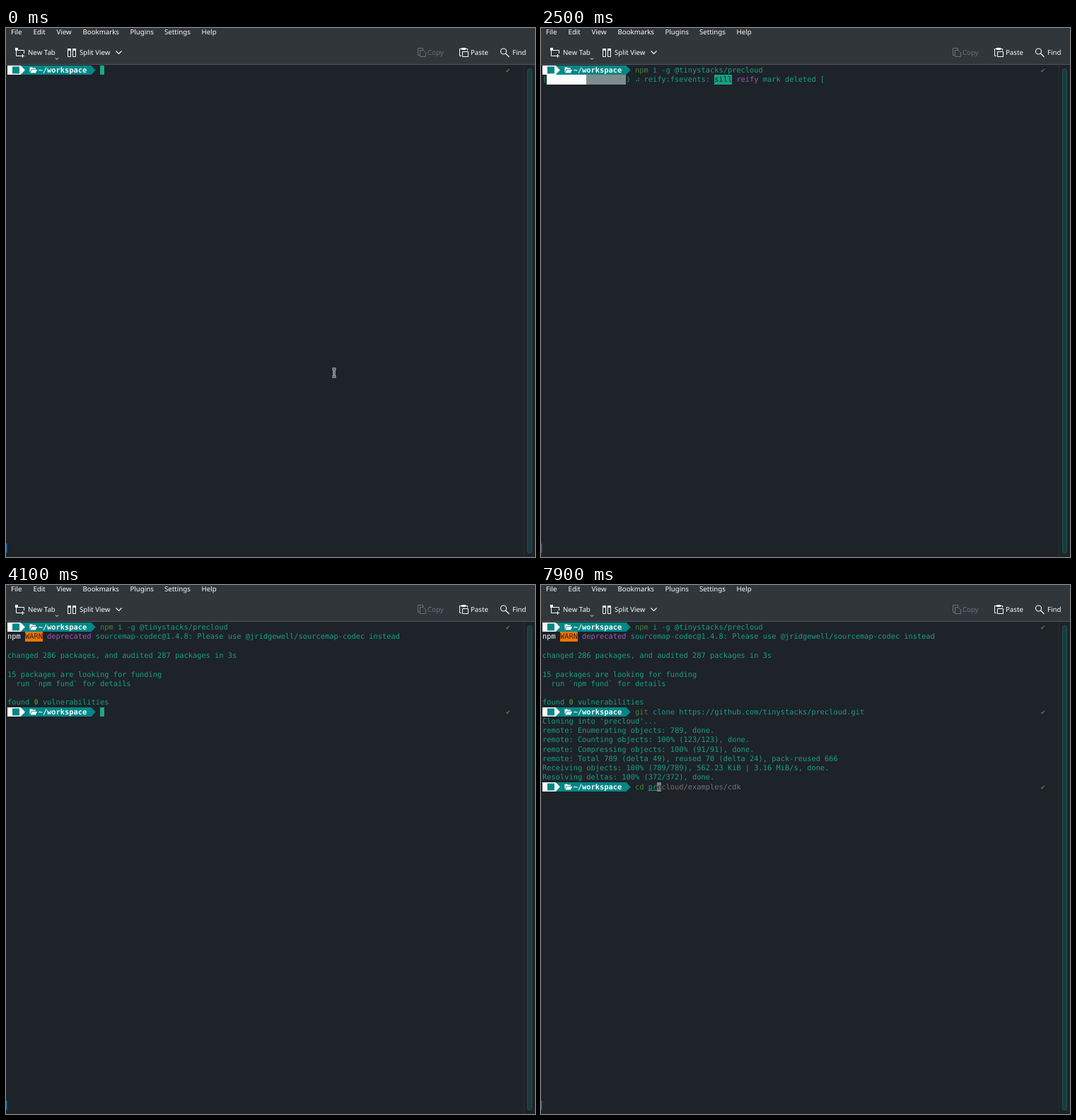
These frames come from a looping animation (748x748 px, 8000 ms). An HTML page with a canvas:

```html
<!DOCTYPE html>
<html lang="en">
<head>
<meta charset="utf-8">
<title>Terminal session</title>
<style>
html, body { margin: 0; width: 100%; height: 100%; overflow: hidden; background: #1e2229; }
canvas { display: block; }
</style>
</head>
<body>
<canvas id="stage" width="748" height="748"></canvas>
<script>
const ctx = document.getElementById('stage').getContext('2d');
const LOOP = 8000, CELL = 6.236, ROW = 13.26, COLS = 115;
const MONO = '10.36px "DejaVu Sans Mono", "DejaVu Sans", monospace';
const UI = '9.7px "Noto Sans", sans-serif';
const BG = '#1e2229', FG = '#16a085', GREEN = '#44853a', PURPLE = '#9b59b6', WHITE = '#fcfcfc',
  TEAL = '#008787', GRAY = '#7f8c8d', HINT = '#78706f', RED = '#ed1515', CURSOR = '#1aa88a';

const X = col => 2 + col * CELL;
const Y = row => 53.2 + row * ROW;

function rect(x, y, w, h, color) {
  ctx.fillStyle = color;
  ctx.fillRect(x, y, w, h);
}

function poly(color, ...pts) {
  ctx.fillStyle = color;
  ctx.beginPath();
  for (let i = 0; i < pts.length; i += 2) ctx.lineTo(pts[i], pts[i + 1]);
  ctx.fill();
}

function stroke(path, color = WHITE, width = 1) {
  ctx.strokeStyle = color;
  ctx.lineWidth = width;
  ctx.stroke(new Path2D(path));
}

function block(row, col, count, color) {
  const x = Math.round(X(col)), y = Math.round(Y(row));
  rect(x, y, Math.round(X(col + count)) - x, Math.round(Y(row + 1)) - y, color);
}

// Writes text on the character grid and returns the next free column.
function put(row, col, text, color = FG, bold = false) {
  ctx.font = (bold ? 'bold ' : '') + MONO;
  ctx.fillStyle = color;
  for (const ch of text) {
    if (col >= COLS) break;
    if (ch !== ' ') ctx.fillText(ch, X(col), Y(row) + 10);
    col++;
  }
  return col;
}

function label(text, x, y, color = WHITE) {
  ctx.font = UI;
  ctx.fillStyle = color;
  ctx.fillText(text, x, y);
}

const latest = (keys, t) => keys.filter(k => k[0] <= t).pop();

function toolbar() {
  rect(0, 0, 748, 52, '#31363b');
  rect(0, 51, 748, 1, '#50565b');
  [['File', 7], ['Edit', 38.5], ['View', 71.5], ['Bookmarks', 108.5], ['Plugins', 175.5],
    ['Settings', 224], ['Help', 276.5]].forEach(([name, x]) => label(name, x, 8.5));
  label('New Tab', 31, 38);
  label('Split View', 104, 38);
  label('Copy', 596, 38, '#6b7075');
  label('Paste', 657, 38);
  label('Find', 716, 38);

  stroke('M14 31.5H17M14.5 29V39.5H21M17 31.5H25.5V36M23.5 37V42M21 39.5H26');
  rect(13, 28, 4, 4, WHITE);
  stroke('M70 42.5L72 44.5L74 42.5');
  stroke('M87.5 29.5H91.5V40.5H87.5ZM94.5 29.5H98.5V40.5H94.5Z');
  rect(87, 29, 5, 3, WHITE);
  rect(94, 29, 5, 3, WHITE);
  stroke('M155.5 32.5L159.5 36.5L163.5 32.5', WHITE, 1.1);
  stroke('M585 38.5H582.5V28.5H589.5V31M585.5 31.5H590L593.5 35V40.5H585.5Z', '#6b7075');
  stroke('M644 39.5H641.5V29.5H652.5V32M645.5 33.5H653.5V40.5H645.5Z');
  rect(644, 28, 6, 3, WHITE);
  stroke('M707.5 33A4 4 0 1 1 699.5 33A4 4 0 1 1 707.5 33M706.5 36L711.5 41', WHITE, 1.1);
}

function frame() {
  rect(0, 0, 748, 748, BG);
  toolbar();
  rect(732, 52, 1, 696, '#292e34');
  ctx.beginPath();
  ctx.roundRect(737.5, 57.5, 6, 685, 3);
  ctx.fillStyle = '#1b3a3c';
  ctx.fill();
  ctx.strokeStyle = '#1d5551';
  ctx.lineWidth = 1;
  ctx.stroke();
  rect(0, 729, 1.5, 13, '#1d6ba5');
}

function prompt(row) {
  const top = Math.round(Y(row)), bottom = Math.round(Y(row + 1)), mid = (top + bottom) / 2;
  const tip = (from, to, color) =>
    poly(color, X(from), top, X(to), top, X(to + 1), mid, X(to), bottom, X(from), bottom);
  tip(3, 19, TEAL);
  tip(0, 3, WHITE);
  rect(9, top + 1.5, 10, 10, TEAL);
  poly(WHITE, 33.5, mid + 3.5, 33.5, mid - 4, 37, mid - 4, 38, mid - 3, 42, mid - 3,
    42, mid - 1.3, 36, mid - 1.3);
  poly(WHITE, 34.3, mid + 4, 36.6, mid - .4, 44.4, mid - .4, 42, mid + 4);
  put(row, 7, '~/workspace', WHITE, true);
  put(row, 113, '✔', GREEN);
}

// Each key is [time, typed text, suggested rest].
function command(row, t, keys, enter) {
  prompt(row);
  const [, typed, hint] = latest(keys, t) || [0, '', ''];
  const [word] = typed.split(' ');
  const known = ['npm', 'git', 'cd'].includes(word);
  let col = put(row, 21, word, known ? GREEN : RED);
  const arg = typed.slice(word.length);
  if (word === 'cd' && arg.length > 1) {
    rect(X(col + 1), Y(row) + 11.3, (arg.length - 1) * CELL, 1, FG);
  }
  col = put(row, col, arg);
  put(row, col, hint, HINT);
  if (t >= enter) return;
  block(row, col, 1, hint.trim() && hint[0] !== ' ' ? '#808080' : CURSOR);
  put(row, col, hint.slice(0, 1), BG);
}

// Typing keys for a command whose rest is offered as a suggestion.
const typing = (full, ...steps) => steps.map(([t, n]) => [t, full.slice(0, n), full.slice(n)]);

const INSTALL = typing('npm i -g @tinystacks/precloud', [200, 1], [300, 2], [500, 3], [700, 5], [800, 29]);
const CLONE = typing('git clone https://github.com/tinystacks/precloud.git', [4500, 1], [4600, 2], [4700, 4], [5100, 52]);
const CHANGE = [
  ...typing('cd precloud', [7600, 1], [7700, 3]),
  ...typing('cd precloud/examples/cdk', [7900, 5])
];

const MODULES = 'reifyNode:node_modules/@tinystacks/precloud/node_modules/';
// time, filled cells, spinner, task, level, highlighted part, rest
const PROGRESS = [
  [1300, 0, '⠙', 'idealTree', 'sill', 'idealTree', 'buildDeps'],
  [1400, 9, '⠹', 'idealTree:precloud', 'sill', 'fetch manifest', '@aws-sdk/client-cloudformation@^3.154.0'],
  [1500, 9, '⠼', 'idealTree:@aws-sdk/client-s3', 'sill', 'placeDep', 'node_modules/@tinystacks/precloud @aws-sdk/client-sts@3.204.0 OK'],
  [1600, 9, '⠴', 'idealTree:@aws-sdk/client-iam', 'sill', 'fetch manifest', 'fast-xml-parser@4.0.11'],
  [1700, 9, '⠧', 'idealTree:@aws-crypto/sha256-js', 'sill', 'fetch manifest', 'strnum@^1.0.5'],
  [1800, 9, '⠇', 'idealTree:fast-xml-parser', 'sill', 'placeDep', 'node_modules/@tinystacks/precloud strnum@1.0.5 OK for: fast-xml-parser'],
  [1900, 9, '⠏', 'idealTree:inquirer', 'sill', 'fetch manifest', 'rxjs@^7.5.5'],
  [2000, 9, '⠙', 'idealTree:ora', 'sill', 'placeDep', 'node_modules/@tinystacks/precloud cli-spinners@2.7.0 OK for: ora@5.4.1'],
  [2100, 9, '⠹', 'idealTree:bl', 'sill', 'placeDep', 'node_modules/@tinystacks/precloud readable-stream@3.6.0 OK for: bl@4.1.0'],
  [2200, 9, '⠼', 'idealTree', 'timing', 'idealTree Completed in 991ms', ''],
  [2500, 9, '⠴', 'reify:fsevents', 'sill', 'reify', 'mark deleted ['],
  [3100, 18, '⠙', 'reify:typescript', 'timing', MODULES + '@aws-crypto/util', ''],
  [3200, 18, '⠹', 'reify:rxjs', 'timing', MODULES + 'sourcemap-codec', ''],
  [3300, 18, '⠸', 'reify:rxjs', 'timing', MODULES + '@aws-sdk/client-sts', ''],
  [3400, 18, '⠼', 'reify:lodash', 'timing', MODULES + '@aws-sdk/client-iam', ''],
  [3500, 18, '⠦', 'reify:lodash', 'timing', MODULES + '@aws-sdk/client-s3', ''],
  [3700, 18, '⠇', 'reify:lodash', 'timing', MODULES + '@aws-sdk/client-ec2', '']
];

function progress(row, [, filled, spinner, task, level, mark, rest]) {
  put(row, 0, '(');
  block(row, 1, 18, GRAY);
  block(row, 1, filled, WHITE);
  let col = put(row, 19, `) ${spinner} ${task}: `);
  if (level === 'sill') block(row, col, 4, FG);
  col = put(row, col, level, level === 'sill' ? BG : GREEN);
  col = put(row, col + 1, mark, PURPLE);
  put(row, col + 1, rest);
}

function install(t) {
  command(0, t, INSTALL, 1100);
  if (t < 1100) return;
  if (t < 1300) return block(1, 0, 1, CURSOR);
  const warned = t >= 3100;
  if (warned) {
    put(1, 0, 'npm', WHITE);
    block(1, 4, 4, '#f67400');
    put(1, 4, 'WARN', '#232627');
    put(1, 9, 'deprecated', PURPLE);
    put(1, 20, 'sourcemap-codec@1.4.8: Please use @jridgewell/sourcemap-codec instead');
  }
  if (t < 4000) return progress(warned ? 2 : 1, latest(PROGRESS, t));
  if (t < 4100) return block(2, 0, 1, CURSOR);
  put(3, 0, 'changed 286 packages, and audited 287 packages in 3s');
  put(5, 0, '15 packages are looking for funding');
  put(6, 0, '  run `npm fund` for details');
  put(8, 0, 'found   vulnerabilities');
  put(8, 6, '0', GREEN, true);
}

const REMOTE = [
  [6100, 11, 'remote: Enumerating objects: 789, done.'],
  [6100, 12, 'remote: Counting objects: 100% (123/123), done.'],
  [6100, 13, 'remote: Compressing objects: 100% (91/91), done.'],
  [6300, 14, 'remote: Total 789 (delta 49), reused 70 (delta 24), pack-reused 666'],
  [6300, 15, 'Receiving objects: 100% (789/789), 562.23 KiB | 3.16 MiB/s, done.'],
  [6300, 16, 'Resolving deltas: 100% (372/372), done.']
];

function clone(t) {
  command(9, t, CLONE, 5500);
  if (t < 5500) return;
  put(10, 0, "Cloning into 'precloud'...");
  for (const [start, row, text] of REMOTE) if (t >= start) put(row, 0, text);
  if (t < 6100) block(11, 0, 1, CURSOR);
  else if (t < 6200) block(14, 0, 1, CURSOR);
  else if (t < 6300) put(14, 0, 'Receiving objects:  45% (356/789)');
  else if (t < 6400) block(17, 0, 1, CURSOR);
}

function pointer() {
  const beam = 'M461.5 482H466.5M461.5 493H466.5M464 482V493';
  stroke(beam, '#e8e8e8', 3);
  stroke(beam, '#15181c', 1);
}

function draw(t) {
  ctx.textRendering = 'geometricPrecision';
  frame();
  install(t);
  if (t >= 4100) clone(t);
  if (t >= 6400) command(17, t, CHANGE, LOOP);
  if (t < 200) pointer();
}

let shown = -1;
function tick() {
  const step = Math.floor(performance.now() % LOOP / 100);
  if (step !== shown) draw((shown = step) * 100);
  requestAnimationFrame(tick);
}
tick();
</script>
</body>
</html>
```
